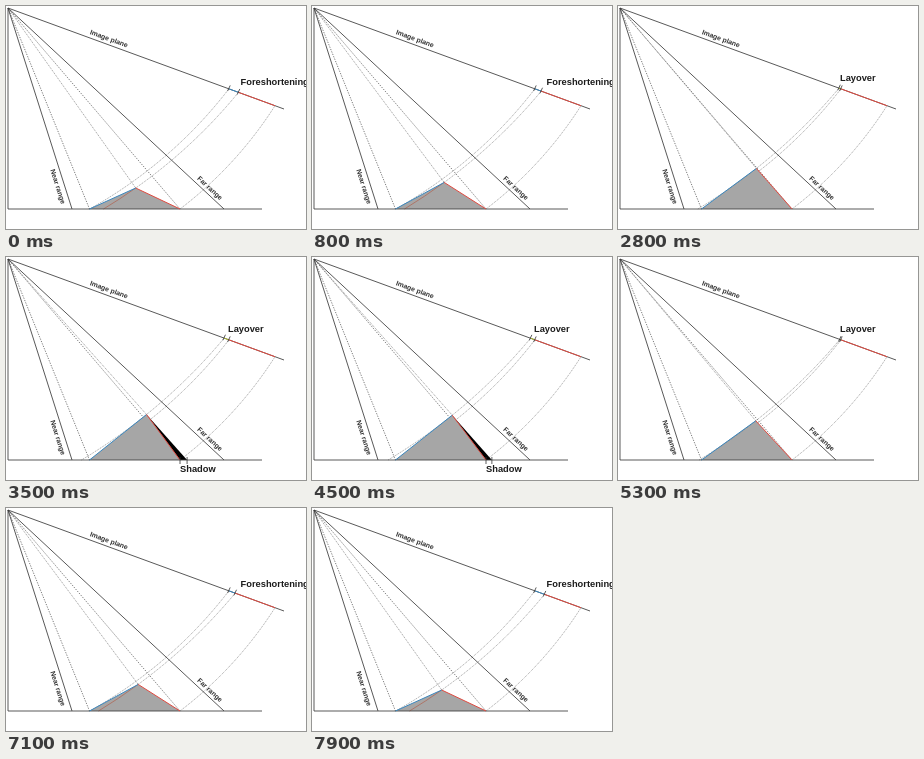
Recreate the animation shown at these times as an HTML page. Size 300 by 223 pixels, loop 8 s.

```html
<!DOCTYPE html>
<html lang="en">
<head>
<meta charset="utf-8">
<title>Radar foreshortening, layover and shadow</title>
<style>
html, body { margin: 0; width: 100%; height: 100%; overflow: hidden; background: #fff; }
svg { display: block; width: 300px; height: 223px; }
path { fill: none; stroke: #000; }
text { font: bold 9.3px "Liberation Sans", Arial, sans-serif; fill: #1c1c1c; }
.frame { stroke: #3c3c3c; stroke-width: .85; }
.ray { stroke: #555; stroke-width: .75; stroke-dasharray: 1.3 1.3; }
.fine { stroke: #777; stroke-width: .75; stroke-dasharray: 1 1; }
.blue { stroke: #3a86bd; stroke-width: 1; }
.red { stroke: #e04a40; stroke-width: 1; }
.tick { stroke: #333; stroke-width: .8; }
.axis { font-size: 6.9px; fill: #333; text-anchor: middle; }
#hill { fill: #a6a6a6; stroke: none; }
#shade { fill: #000; stroke: none; }
#inner { stroke: #b0604e; stroke-width: .7; }
</style>
</head>
<body>
<svg viewBox="0 0 300 223">
  <path class="fine" id="nearArc"/>
  <path class="fine" id="farArc"/>
  <path class="ray" d="M2 2L83.5 203M2 2L174 203"/>
  <path id="hill"/>
  <path id="shade"/>
  <path id="inner"/>
  <path class="fine" id="topArc"/>
  <path class="fine" id="topRay"/>
  <path class="frame" d="M2 203V2L278 103M2 2L66 203M2 2L218 203M2 203H256"/>
  <path class="blue" id="front"/>
  <path class="red" id="back"/>
  <path id="span"/>
  <path class="red" id="backSpan"/>
  <path class="tick" id="ticks"/>
  <path class="tick" id="groundTicks"/>
  <text class="axis" dy=".35em" transform="translate(103 32.5) rotate(20.1)">Image plane</text>
  <text class="axis" dy=".35em" transform="translate(52 180.5) rotate(72.3)">Near range</text>
  <text class="axis" dy=".35em" transform="translate(204 182) rotate(42.9)">Far range</text>
  <text id="effect"></text>
  <text id="shadow" x="174" y="215">Shadow</text>
</svg>
<script>
const STEP = 100, STEPS = 80;
const GROUND = 203, NEAR = 83.5, FAR = 174, NEAR_PLANE = 222.9, FAR_PLANE = 269;
const $ = id => document.getElementById(id);
const draw = (id, d) => $(id).setAttribute("d", d);
const show = (id, on) => $(id).style.display = on ? "" : "none";

const onPlane = x => [x, 2 + (x - 2) * 101 / 276];
const line = (...pts) => "M" + pts.map(p => p.join(" ")).join("L");
const arc = (a, r, b) => `M${a}A${r} ${r} 0 0 0 ${b}`;

function tick(x) {
  const [, y] = onPlane(x);
  return line([x - 1.3, y + 2.2], [x + 1.3, y - 3.4]);
}

// Radius of the shallow arc from a to b that passes through m.
function radius(a, m, b) {
  const dx = b[0] - a[0], dy = b[1] - a[1], len = Math.hypot(dx, dy);
  const vx = m[0] - a[0], vy = m[1] - a[1];
  const along = (vx * dx + vy * dy) / len;
  const off = (vy * dx - vx * dy) / len;
  return (along * (len - along) + off * off) / (2 * off);
}

function render(ms) {
  const step = Math.floor(ms / STEP) % STEPS;
  const n = Math.min(step, STEPS - 1 - step);
  const top = [129.7 + .31 * n, 182 - .7 * n];
  const foot = [97.5 - .63 * n, GROUND];
  const topPlane = 232.5 - .41 * n;
  const layover = topPlane < NEAR_PLANE;
  const near = [NEAR, GROUND], far = [FAR, GROUND];
  const shadowEnd = 2 + (top[0] - 2) * (GROUND - 2) / (top[1] - 2);
  const shaded = shadowEnd > FAR;
  const end = [shadowEnd, GROUND];

  draw("hill", line(near, top, far) + "Z");
  draw("front", line(near, top));
  draw("back", line(top, far));
  draw("shade", line(top, far, end) + "Z");
  draw("topRay", line([2, 2], top));

  const r = radius(foot, top, onPlane(topPlane));
  draw("inner", arc(foot, r, top));
  draw("topArc", arc(layover ? foot : top, r, onPlane(topPlane)));
  show("inner", !layover);

  draw("span", line(onPlane(topPlane), onPlane(NEAR_PLANE)));
  $("span").style.stroke = layover ? "#a9b52a" : "#3a86bd";
  draw("backSpan", line(onPlane(Math.max(topPlane, NEAR_PLANE)), onPlane(FAR_PLANE)));
  draw("ticks", tick(NEAR_PLANE) + tick(topPlane));
  draw("groundTicks", `M${FAR} 200V207M${shadowEnd} 200V207`);

  const label = $("effect");
  label.textContent = layover ? "Layover" : "Foreshortening";
  label.setAttribute("x", layover ? 222 : 234.6);
  label.setAttribute("y", layover ? 75 : 79);
  for (const id of ["shade", "groundTicks", "shadow"]) show(id, shaded);
}

draw("nearArc", arc([NEAR, GROUND], 455, onPlane(NEAR_PLANE)));
draw("farArc", arc([FAR, GROUND], 400, onPlane(FAR_PLANE)));

const start = performance.now();
function loop() {
  render(performance.now() - start);
  requestAnimationFrame(loop);
}
render(0);
requestAnimationFrame(loop);
</script>
</body>
</html>
```
